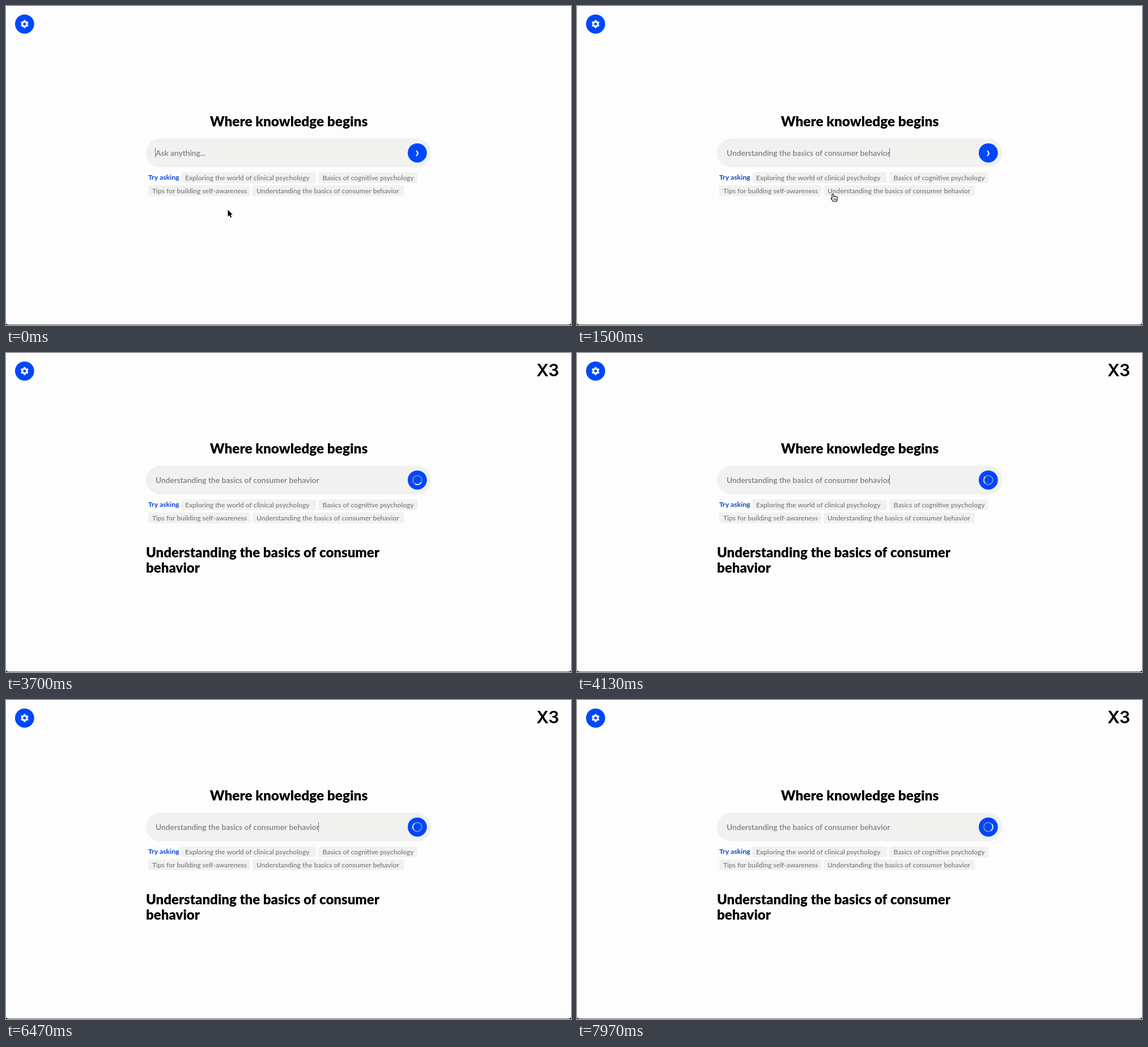
An HTML page with a canvas for the animation above (8000 ms loop, 997 by 562 pixels).

```html
<!DOCTYPE html>
<html lang="en">
<head>
<meta charset="utf-8">
<title>Where knowledge begins</title>
<style>
html, body { margin: 0; width: 100%; height: 100%; overflow: hidden; background: #fdfdfd; }
canvas { display: block; }
</style>
</head>
<body>
<canvas id="stage" width="997" height="562"></canvas>
<script>
const ctx = document.getElementById('stage').getContext('2d');
const W = 997, H = 562, LOOP = 8000;
const BLUE = '#0047fb', GRAY = '#7f7f7f', FIELD = '#f1f1f0', PAGE = '#fdfdfd';
const QUERY = 'Understanding the basics of consumer behavior';
const CLICK = 1300, SUBMIT = 2100, FAST = 3370;

const TITLE_FONT = '900 24.4px Lato, "Open Sans", sans-serif';
const HEADING_FONT = '900 24px Lato, "Open Sans", sans-serif';
const INPUT_FONT = '600 13.75px Lato, "Open Sans", sans-serif';
const CHIP_FONT = '600 12px Lato, "Open Sans", sans-serif';
const LABEL_FONT = '700 12.2px Lato, "Open Sans", sans-serif';
const SPEED_FONT = '600 30px Inter, Roboto, sans-serif';

const CHIPS = [
  { x: 309, y: 293, w: 238, text: 'Exploring the world of clinical psychology' },
  { x: 551.5, y: 293, w: 174.5, text: 'Basics of cognitive psychology' },
  { x: 251, y: 316, w: 180, text: 'Tips for building self-awareness' },
  { x: 435, y: 316, w: 267, text: QUERY }
];

function text(str, x, y, font, color, align = 'left') {
  ctx.font = font;
  ctx.fillStyle = color;
  ctx.textAlign = align;
  ctx.fillText(str, x, y);
}

function disc(x, y, r, color) {
  ctx.fillStyle = color;
  ctx.beginPath();
  ctx.arc(x, y, r, 0, Math.PI * 2);
  ctx.fill();
}

function box(x, y, w, h, r, color) {
  ctx.fillStyle = color;
  ctx.beginPath();
  ctx.roundRect(x, y, w, h, r);
  ctx.fill();
}

function settingsButton() {
  ctx.save();
  ctx.translate(32.8, 31.8);
  disc(0, 0, 16.9, BLUE);
  disc(0, 0, 5.2, '#fff');
  for (let i = 0; i < 6; i++) {
    ctx.beginPath();
    ctx.moveTo(-2.4, -4);
    ctx.lineTo(-1.5, -7);
    ctx.lineTo(1.5, -7);
    ctx.lineTo(2.4, -4);
    ctx.fill();
    ctx.rotate(Math.PI / 3);
  }
  disc(0, 0, 2.5, BLUE);
  ctx.restore();
}

function chevron(x, y) {
  ctx.strokeStyle = '#fff';
  ctx.lineWidth = 2;
  ctx.beginPath();
  ctx.moveTo(x - 1.7, y - 4);
  ctx.lineTo(x + 1.2, y + 0.8);
  ctx.lineTo(x - 1.7, y + 5.5);
  ctx.stroke();
}

function spinner(x, y, t) {
  const turns = t < FAST ? (t - 2530) / 1000 : 0.75 + 3 * (t - 5130) / 1000;
  const mid = (turns - 0.25) * Math.PI * 2;
  ctx.lineWidth = 1.7;
  ctx.strokeStyle = '#8793ad';
  ctx.beginPath();
  ctx.arc(x, y, 8, 0, Math.PI * 2);
  ctx.stroke();
  ctx.strokeStyle = '#f2f2f2';
  ctx.beginPath();
  ctx.arc(x, y, 8, mid - Math.PI / 4, mid + Math.PI / 4);
  ctx.stroke();
}

function caretOn(t) {
  const mod = v => v - Math.floor(v);
  if (t < CLICK) return mod(t / 1000) < 0.5;
  if (t < FAST) return mod((t - CLICK) / 1000) < 0.5;
  return mod(3 * (t - 5130) / 1000 + 0.15) < 0.5;
}

function searchForm(t, loading) {
  const filled = t >= CLICK;
  text('Where knowledge begins', 499, 212, TITLE_FONT, '#000', 'center');
  box(247, 233.5, 503.5, 50.5, 25.25, FIELD);
  text(filled ? QUERY : 'Ask anything...', 264, 264, INPUT_FONT, GRAY);
  if (caretOn(t)) {
    const end = filled ? ctx.measureText(QUERY).width : 0;
    ctx.fillStyle = '#777';
    ctx.fillRect(Math.floor(263.5 + end), 250, 1, 17);
  }
  disc(725.8, 258.8, 16.9, BLUE);
  if (loading) spinner(725.8, 258.8, t);
  else chevron(725.8, 258.8);

  text('Try asking', 251, 305.5, LABEL_FONT, '#0644d2');
  for (const c of CHIPS) {
    box(c.x, c.y, c.w, 19, 4, FIELD);
    text(c.text, c.x + 7, c.y + 14, CHIP_FONT, GRAY);
  }
}

function arrow(x, y) {
  ctx.beginPath();
  ctx.moveTo(x, y);
  for (const [dx, dy] of [[0, 12], [2.8, 9.5], [4.7, 13.8], [6.6, 13], [4.8, 8.8], [8.3, 8.4]]) {
    ctx.lineTo(x + dx, y + dy);
  }
  ctx.closePath();
  ctx.lineJoin = 'round';
  ctx.lineWidth = 1.6;
  ctx.strokeStyle = '#fff';
  ctx.stroke();
  ctx.fillStyle = '#000';
  ctx.fill();
}

function hand(x, y) {
  ctx.save();
  ctx.translate(x, y);
  ctx.beginPath();
  ctx.moveTo(-1.2, 8);
  ctx.lineTo(-1.6, 1);
  ctx.quadraticCurveTo(-0.4, -1, 0.8, 1);
  ctx.lineTo(1.3, 4.6);
  ctx.quadraticCurveTo(2.8, 3.4, 3.8, 5);
  ctx.quadraticCurveTo(5.3, 4, 6.2, 5.6);
  ctx.quadraticCurveTo(7.8, 5, 8.2, 6.8);
  ctx.lineTo(7.5, 10.5);
  ctx.lineTo(6.5, 13.2);
  ctx.lineTo(0.3, 13.2);
  ctx.quadraticCurveTo(-1, 10.8, -3.2, 8.4);
  ctx.quadraticCurveTo(-3.2, 6.6, -1.2, 8);
  ctx.closePath();
  ctx.fillStyle = '#fff';
  ctx.fill();
  ctx.strokeStyle = '#000';
  ctx.lineWidth = 1.1;
  ctx.stroke();
  ctx.lineWidth = 0.8;
  ctx.beginPath();
  for (const dx of [1.8, 3.7, 5.6]) {
    ctx.moveTo(dx, 8);
    ctx.lineTo(dx, 11.4);
  }
  ctx.stroke();
  ctx.restore();
}

function pointer(t) {
  const p = Math.min(1, Math.max(0, (t - 250) / 750));
  const e = p * p * (3 - 2 * p);
  const x = 391.5 + 60 * e, y = 359 - 28 * e;
  (y < 335 ? hand : arrow)(x, y);
}

function windowEdge() {
  ctx.fillStyle = '#6a6a6a';
  ctx.fillRect(0, 561, W, 1);
  ctx.fillStyle = '#000';
  for (const [x, dir] of [[0, 1], [W, -1]]) {
    ctx.beginPath();
    ctx.moveTo(x, H - 4);
    ctx.quadraticCurveTo(x, H - 1, x + 4 * dir, H - 0.5);
    ctx.lineTo(x + 4 * dir, H);
    ctx.lineTo(x, H);
    ctx.fill();
  }
}

function draw(t) {
  const loading = t >= SUBMIT;
  ctx.fillStyle = PAGE;
  ctx.fillRect(0, 0, W, H);
  settingsButton();

  ctx.save();
  if (loading) ctx.translate(0, -35);
  searchForm(t, loading);
  ctx.restore();

  if (loading) {
    text('Understanding the basics of consumer', 247, 360, HEADING_FONT, '#000');
    text('behavior', 247, 386.5, HEADING_FONT, '#000');
  } else {
    pointer(t);
  }
  if (t >= FAST) text('X3', 956, 41, SPEED_FONT, '#000', 'center');
  windowEdge();
}

const start = performance.now();
function tick() {
  draw((performance.now() - start) % LOOP);
  requestAnimationFrame(tick);
}
tick();
</script>
</body>
</html>
```
